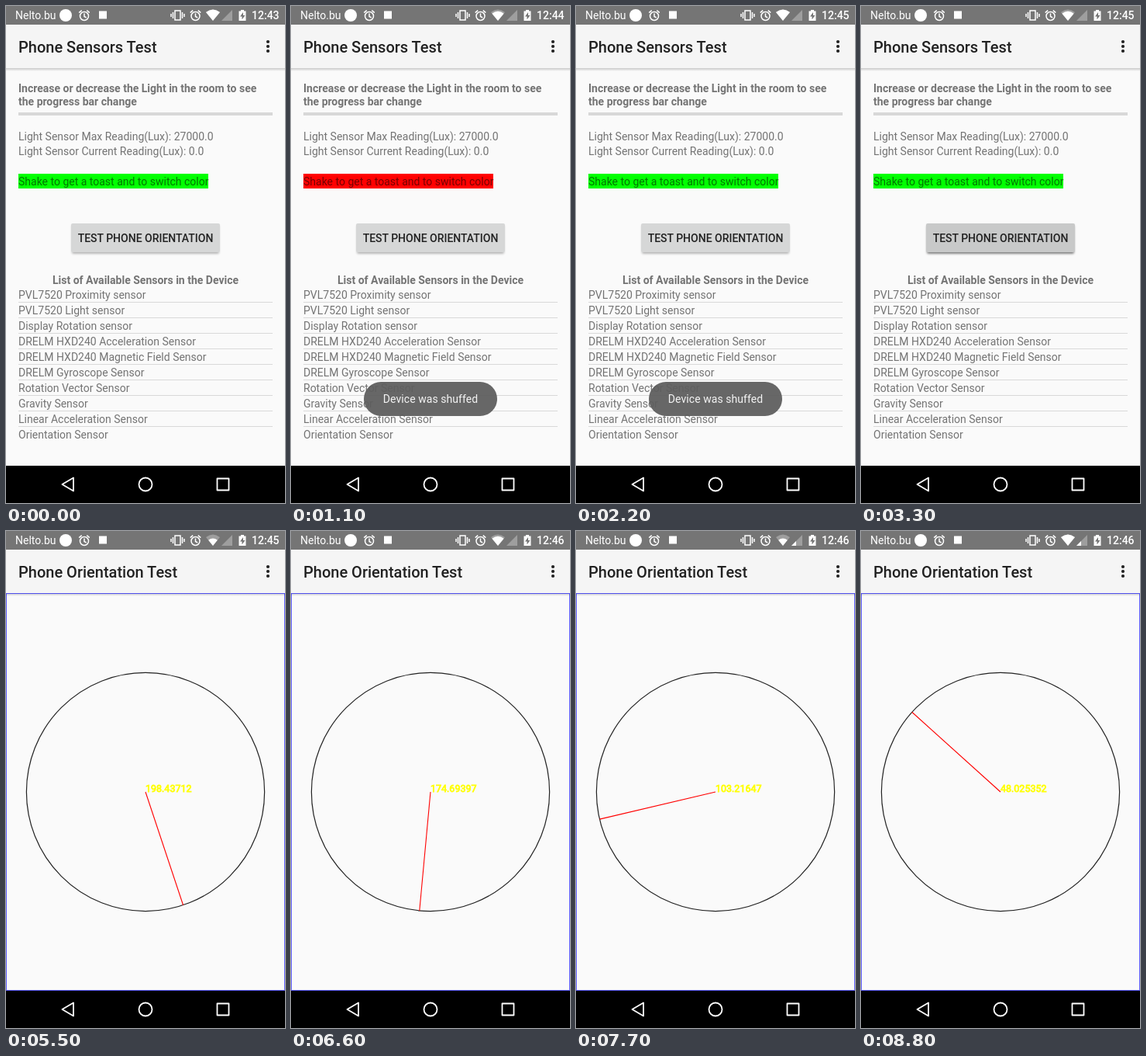
An HTML page for the animation above (9900 ms loop, 360 px wide and 640 px high).

```html
<!DOCTYPE html>
<html lang="en">
<head>
<meta charset="utf-8">
<title>Phone Sensors Test</title>
<style>
  html, body { margin: 0; width: 100%; height: 100%; overflow: hidden; background: #fafafa; }
  svg { display: block; width: 360px; height: 640px; }
  text { font: 14px Roboto, "Noto Sans", sans-serif; fill: rgba(0, 0, 0, .54); }
  .bold { font-weight: 700; }
  .status { font-weight: 500; fill: #fff; }
  .title { font-size: 20px; font-weight: 500; fill: #212121; }
  .label { font-weight: 500; fill: #212121; }
  .mid { text-anchor: middle; }
  .line { fill: none; stroke: #fff; stroke-width: 1.5; }
  #toast text { fill: #f4f4f4; }
  #angle { font-size: 12.5px; fill: #ff0; stroke: #ff0; stroke-width: .8; }
</style>
</head>
<body>
<svg viewBox="0 0 360 640">
  <defs>
    <linearGradient id="shade" x2="0" y2="1">
      <stop offset="0" stop-color="#000" stop-opacity=".2"/>
      <stop offset="1" stop-color="#000" stop-opacity="0"/>
    </linearGradient>
    <filter id="soft" x="-10%" y="-40%" width="120%" height="180%">
      <feGaussianBlur stdDeviation="1.6"/>
    </filter>
    <g id="alarm">
      <circle class="line" r="5.5" cy="1"/>
      <path class="line" d="M0-2.5V1.5L2.7 3M-6.8-3.4L-3.3-6.4M6.8-3.4L3.3-6.4"/>
    </g>
    <path id="fan" d="M0 0L-9-11Q0-18 9-11Z" fill="#fff"/>
  </defs>

  <rect width="360" height="640" fill="#fafafa"/>
  <rect y="80" width="360" height="4" fill="url(#shade)"/>

  <g id="sensors">
    <text class="bold" x="16" y="111">Increase or decrease the Light in the room to see</text>
    <text class="bold" x="16" y="128">the progress bar change</text>
    <rect x="16" y="137" width="328" height="4" fill="#d8d8d8"/>
    <text x="16" y="173">Light Sensor Max Reading(Lux): 27000.0</text>
    <text x="16" y="192">Light Sensor Current Reading(Lux): 0.0</text>
    <rect id="strip" x="16" y="216" width="245" height="19"/>
    <text x="16" y="231">Shake to get a toast and to switch color</text>
    <rect id="glow" x="85" y="282" width="190" height="37" rx="2" filter="url(#soft)"/>
    <rect id="button" x="84" y="280" width="192" height="37" rx="2"/>
    <text class="label mid" x="180" y="304">TEST PHONE ORIENTATION</text>
    <text class="bold mid" x="180" y="358">List of Available Sensors in the Device</text>
    <g id="list"></g>
    <g id="toast">
      <rect x="94" y="484" width="172" height="44" rx="22" fill="#5e5e5e" opacity=".94"/>
      <text class="mid" x="180" y="511" letter-spacing=".06">Device was shuffed</text>
    </g>
  </g>

  <g id="compass">
    <rect x=".5" y="80.5" width="359" height="511" fill="none" stroke="#00f" stroke-opacity=".62"/>
    <circle cx="180" cy="336" r="153.6" fill="none" stroke="#222" stroke-width="1.2"/>
    <path id="needle" stroke="#f00" stroke-width="1.1"/>
    <text id="angle" x="180" y="336"></text>
  </g>

  <rect y="24" width="360" height="56" fill="#f5f5f5"/>
  <text id="title" class="title" x="16" y="60"></text>
  <g fill="#212121">
    <circle cx="338" cy="46" r="2.1"/><circle cx="338" cy="52" r="2.1"/><circle cx="338" cy="58" r="2.1"/>
  </g>

  <rect width="360" height="24" fill="#757575"/>
  <text class="status" style="font-weight:400" x="12" y="17">Nelto.bu</text>
  <circle cx="77" cy="12" r="8" fill="#fff"/>
  <use href="#alarm" x="101" y="12"/>
  <rect x="120" y="6.5" width="10" height="10" fill="#fff"/>
  <path class="line" d="M218 6h7v12h-7zM215.5 8v8M227.5 8v8M213 10v4M230 10v4"/>
  <use href="#alarm" x="244.5" y="12"/>
  <g transform="translate(267 19)">
    <use href="#fan" opacity=".3"/>
    <use href="#fan" id="wifi"/>
  </g>
  <path d="M278 19L292 5V19Z" fill="#fff" opacity=".3"/>
  <path id="signal" d="M278 19L284 13V19Z" fill="#fff"/>
  <path d="M303 5h4v1.5h2.5V19h-9V6.500h2.500z" fill="#fff"/>
  <path d="M306 8l-4 5.500h2.500V17.500l4-5.500H306z" fill="#757575"/>
  <text id="clock" class="status" x="317" y="17"></text>

  <rect y="592" width="360" height="48"/>
  <g class="line" style="stroke-width:1.8" stroke-linejoin="round">
    <path d="M72.500 616L87 607.500V624.500Z"/>
    <circle cx="180" cy="616" r="8.500"/>
    <rect x="272.500" y="608.500" width="15" height="15"/>
  </g>
</svg>
<script>
  const STEP = 1100;
  const GREEN = "#00ff00", RED = "#ff0000";
  const $ = id => document.getElementById(id);
  const show = (id, on) => $(id).setAttribute("display", on ? "inline" : "none");
  const set = (id, attrs) => {
    for (const key in attrs) $(id).setAttribute(key, attrs[key]);
  };

  const sensors = [
    "PVL7520 Proximity sensor", "PVL7520 Light sensor", "Display Rotation sensor",
    "DRELM HXD240 Acceleration Sensor", "DRELM HXD240 Magnetic Field Sensor",
    "DRELM Gyroscope Sensor", "Rotation Vector Sensor", "Gravity Sensor",
    "Linear Acceleration Sensor", "Orientation Sensor"
  ];
  $("list").innerHTML = sensors.map((name, i) =>
    `<text x="16" y="${377 + i * 20}">${name}</text>` +
    (i < 9 ? `<rect x="16" y="${381 + i * 20}" width="328" height="1" fill="#d9d9d9"/>` : "")
  ).join("");

  // Each state lasts one STEP; wifi is the filled share of the fan.
  const states = [
    { clock: "12:43", wifi: 1, strip: GREEN },
    { clock: "12:44", wifi: .85, strip: RED, toast: true },
    { clock: "12:45", wifi: 1, strip: GREEN, toast: true },
    { clock: "12:45", wifi: .85, strip: GREEN, pressed: true },
    { clock: "12:45", wifi: .85, angle: "228.86284" },
    { clock: "12:45", wifi: .65, angle: "198.43712" },
    { clock: "12:46", wifi: .85, angle: "174.69397" },
    { clock: "12:46", wifi: .65, angle: "103.21647", signal: true },
    { clock: "12:46", wifi: 1, angle: "48.025352", signal: true }
  ];

  function render(s) {
    const compass = "angle" in s;
    show("sensors", !compass);
    show("compass", compass);
    show("toast", s.toast);
    show("signal", s.signal);
    $("clock").textContent = s.clock;
    $("title").textContent = compass ? "Phone Orientation Test" : "Phone Sensors Test";
    set("wifi", { transform: `scale(${s.wifi})` });
    if (compass) {
      const a = s.angle * Math.PI / 180;
      set("needle", { d: `M180 336l${-153.6 * Math.sin(a)} ${-153.6 * Math.cos(a)}` });
      $("angle").textContent = s.angle;
    } else {
      set("strip", { fill: s.strip });
      set("button", { fill: s.pressed ? "#c8c9c9" : "#d6d7d7" });
      set("glow", { opacity: s.pressed ? .5 : .28 });
    }
  }

  const start = performance.now();
  let current = -1;
  function tick() {
    const i = Math.floor((performance.now() - start) / STEP) % states.length;
    if (i !== current) render(states[current = i]);
    requestAnimationFrame(tick);
  }
  tick();
</script>
</body>
</html>
```
